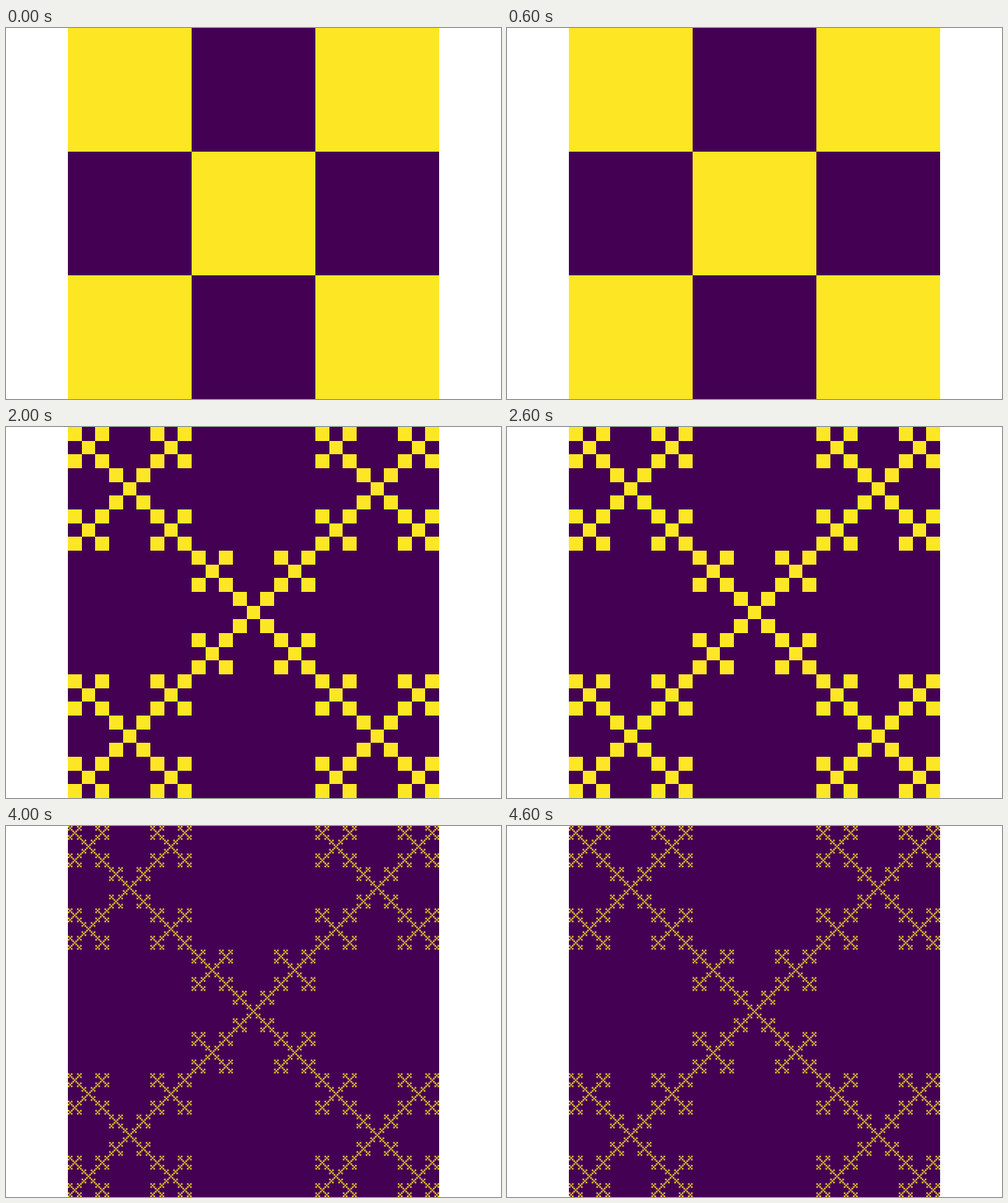
An HTML page with a canvas for the animation above (5 s loop, 600 by 450 pixels).

```html
<!DOCTYPE html>
<html>
<head>
<meta charset="utf-8">
<title>Vicsek fractal</title>
<style>
  html, body { margin: 0; width: 100%; height: 100%; overflow: hidden; background: #fff; }
  canvas { display: block; }
</style>
</head>
<body>
<canvas id="stage" width="600" height="450"></canvas>
<script>
const SIZE = 450, LEFT = 75, STEP = 1000, LEVELS = 5;
const DARK = [68, 1, 84], LIGHT = [253, 231, 37];
const ctx = document.getElementById('stage').getContext('2d');

// A cell is lit when it lies on the X pattern at every scale.
function lit(x, y, level) {
  for (; level > 0; level--) {
    if ((x % 3 + y % 3) % 2) return 0;
    x = Math.floor(x / 3);
    y = Math.floor(y / 3);
  }
  return 1;
}

// The two neighbouring cells of a pixel and the Hann weight of the second.
function hann(p, n) {
  const u = (p + 0.5) * n / SIZE - 0.5, i = Math.floor(u);
  return [Math.max(i, 0), Math.min(i + 1, n - 1), (1 - Math.cos(Math.PI * (u - i))) / 2];
}

function nearest(p, n) {
  const i = Math.floor((p + 0.5) * n / SIZE);
  return [i, i, 0];
}

const mix = (a, b, w) => a + (b - a) * w;

function render(level) {
  const n = 3 ** level, image = ctx.createImageData(SIZE, SIZE);
  // Cells under three pixels wide are smoothed.
  const sample = SIZE / n < 3 ? hann : nearest;
  const axis = Array.from({ length: SIZE }, (_, p) => sample(p, n));
  axis.forEach(([y0, y1, wy], py) => axis.forEach(([x0, x1, wx], px) => {
    const row = y => mix(lit(x0, y, level), lit(x1, y, level), wx);
    const v = mix(row(y0), row(y1), wy);
    const rgb = DARK.map((d, c) => mix(d, LIGHT[c], v));
    image.data.set([...rgb, 255], (py * SIZE + px) * 4);
  }));
  return image;
}

const images = Array.from({ length: LEVELS }, (_, i) => render(i + 1));
const start = performance.now();
let shown = -1;

function draw() {
  const t = Math.max(0, performance.now() - start);
  const index = Math.floor(t / STEP) % LEVELS;
  if (index !== shown) ctx.putImageData(images[shown = index], LEFT, 0);
  requestAnimationFrame(draw);
}
draw();
</script>
</body>
</html>
```
